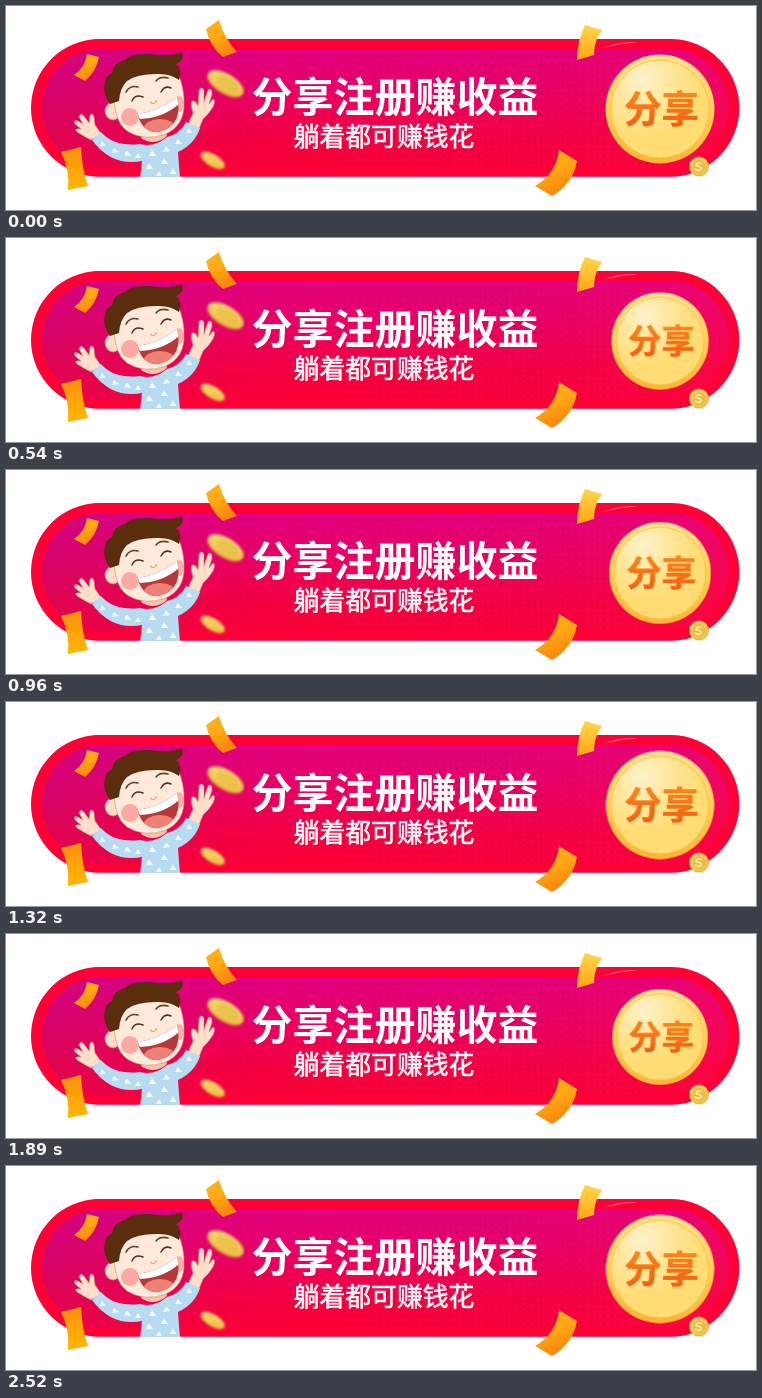
Animation of 750x204 px, one loop 2550 ms. Source, as an HTML page:

```html
<!DOCTYPE html>
<html lang="zh">
<head>
<meta charset="utf-8">
<style>
html, body { margin: 0; width: 100%; height: 100%; overflow: hidden; background: #fff; }
svg { display: block; width: 750px; height: 204px; }
text { font-family: "Noto Sans CJK SC", "Noto Sans CJK", sans-serif; text-anchor: middle; }
.share { transform-origin: 654px 103px; animation: pulse 2550ms linear infinite; }
@keyframes pulse {
  0%, 50.6%, 100% { transform: scale(1); }
  25.3%, 75.3% { transform: scale(.873); }
}
</style>
</head>
<body>
<svg viewBox="0 0 750 204">
  <defs>
    <linearGradient id="panel" x2="0" y2="1">
      <stop stop-color="#e20082"/>
      <stop offset=".4" stop-color="#ec0062"/>
      <stop offset=".75" stop-color="#f70040"/>
      <stop offset="1" stop-color="#fd0035"/>
    </linearGradient>
    <linearGradient id="side">
      <stop stop-color="#a01080" stop-opacity=".3"/>
      <stop offset=".4" stop-color="#d00070" stop-opacity="0"/>
      <stop offset="1" stop-color="#ff1050" stop-opacity=".3"/>
    </linearGradient>
    <linearGradient id="ribbon" x2=".4" y2="1">
      <stop stop-color="#ffb31c"/>
      <stop offset=".5" stop-color="#ffa914"/>
      <stop offset="1" stop-color="#fb860b"/>
    </linearGradient>
    <linearGradient id="pale" x2="0" y2="1">
      <stop stop-color="#ffd84a"/>
      <stop offset="1" stop-color="#ffa416"/>
    </linearGradient>
    <linearGradient id="amber" x2="0" y2="1">
      <stop stop-color="#fa900c"/>
      <stop offset="1" stop-color="#ffb705"/>
    </linearGradient>
    <linearGradient id="rim" x2="0" y2="1">
      <stop stop-color="#ffe28c"/>
      <stop offset=".5" stop-color="#ffcf55"/>
      <stop offset="1" stop-color="#fbb536"/>
    </linearGradient>
    <radialGradient id="disc" cx=".32" cy=".2" r=".6">
      <stop stop-color="#fff3cc"/>
      <stop offset=".5" stop-color="#ffe69a"/>
      <stop offset="1" stop-color="#ffdd74"/>
    </radialGradient>
    <linearGradient id="ink" x2="0" y2="1">
      <stop stop-color="#fb9420"/>
      <stop offset="1" stop-color="#f4560f"/>
    </linearGradient>
    <linearGradient id="gold" x2="1" y2="1">
      <stop stop-color="#f3d878"/>
      <stop offset="1" stop-color="#efbc3a"/>
    </linearGradient>
    <linearGradient id="fade">
      <stop stop-color="#fff" stop-opacity=".2"/>
      <stop offset=".75" stop-color="#fff"/>
      <stop offset="1" stop-color="#fff" stop-opacity=".4"/>
    </linearGradient>
    <mask id="spread"><path d="M210 47H650V160H210Z" fill="url(#fade)"/></mask>
    <pattern id="dots" width="7" height="7" patternUnits="userSpaceOnUse">
      <circle cx="3.5" cy="3.5" r="1.4" fill="#b80048" opacity=".4"/>
    </pattern>
    <filter id="soft"><feGaussianBlur stdDeviation=".8"/></filter>
    <clipPath id="pill"><path d="M0 0H750V171H0Z"/></clipPath>
    <clipPath id="mouth"><path d="M132 108Q154 105 171 91Q176 111 164 121Q149 131 138 121Q133 116 132 108Z"/></clipPath>
  </defs>

  <rect x="25" y="33" width="708.3" height="137.7" rx="68.8" fill="#ff0036"/>
  <g>
    <rect id="inner" x="36" y="43" width="687" height="118" rx="59" fill="url(#panel)"/>
    <rect x="36" y="43" width="687" height="118" rx="59" fill="url(#side)"/>
    <rect x="210" y="47" width="440" height="113" fill="url(#dots)" mask="url(#spread)"/>
  </g>

  <!-- boy -->
  <g clip-path="url(#pill)">
    <path d="M85 134Q77 130 71 126Q67 122 75 123L69 118Q67 113 72 115L77 118 73 111Q74 106 78 110L83 117 84 109Q87 106 88 111L89 119Q93 124 95 128Z" fill="#ffdfca" stroke="#c98a72" stroke-width=".6"/>
    <path d="M182 118L187 107Q184 98 186 95Q190 94 192 100L193 84Q195 80 198 84L198 96 202 84Q206 81 206 88L203 98 207 93Q210 94 207 101Q202 109 197 113L193 123Z" fill="#ffdfca" stroke="#c98a72" stroke-width=".6"/>
    <path d="M86 134L95 126Q108 141 134 138Q148 142 161 131Q174 128 180 116L194 122Q189 138 172 146L174 172H134L136 155Q106 161 86 134Z" fill="#b9dbf2"/>
    <path d="M96 135l4 5h-6zm12 7l5 4-7 1zm13 2l4 6-7-1zm11 3l3 5-6 0zm14-3l4 6-7 0zm14-4l4 5-7 1zm12-7l4 5-7 0zm11-11l3 5-6 0zM143 157l4 6-7 0zm15-5l4 6-7 0zm9 10l3 6-6 0zm-14 3l3 5-6 0z" fill="#f4faff"/>
    <path d="M135 132Q148 141 161 130L160 126 138 128Z" fill="#f3c3a8"/>
    <ellipse cx="107" cy="105" rx="8" ry="9" fill="#ffdcc5" stroke="#c98a72" stroke-width=".7"/>
    <path d="M107 82Q107 62 130 57Q157 48 171 66Q179 81 178 101Q177 120 160 128Q139 136 121 125Q107 115 107 82Z" fill="#fee9db" stroke="#c98a72" stroke-width=".6"/>
    <path d="M104 98Q96 88 99 76Q100 70 106 67Q107 57 119 54Q123 47 143 48Q165 51 176 46Q179 54 170 58Q177 63 173 74Q164 67 150 68Q131 68 121 75Q114 82 113 95Z" fill="#5a2d0c"/>
    <path d="M120 86Q124 79 132 81M150 75Q154 70 162 72" fill="none" stroke="#6d3d1c" stroke-width="1.6" stroke-linecap="round"/>
    <path d="M126 95Q129 88 137 91M155 86Q159 79 165 82" fill="none" stroke="#55301b" stroke-width="1.5" stroke-linecap="round"/>
    <circle cx="124" cy="111" r="9" fill="#f9918c" opacity=".75"/>
    <ellipse cx="173" cy="98" rx="5" ry="8" fill="#f9918c" opacity=".65"/>
    <path d="M144 96Q148 100 151 94" fill="none" stroke="#e8a888" stroke-width="1.3"/>
    <g clip-path="url(#mouth)">
      <path d="M125 85H180V135H125Z" fill="#b8393b"/>
      <ellipse cx="154" cy="122" rx="16" ry="9" fill="#ee8078"/>
      <path d="M130 106Q154 105 173 89L173 98Q157 112 134 113Z" fill="#fff"/>
    </g>
  </g>

  <!-- coins -->
  <g transform="translate(220 77) rotate(31)" filter="url(#soft)">
    <ellipse cy="1.5" rx="20" ry="9.5" fill="#dba23c"/>
    <ellipse rx="20" ry="9" fill="url(#gold)"/>
    <ellipse cx="2" rx="12" ry="6" fill="#eac24e"/>
  </g>
  <g transform="translate(207 154) rotate(31)" filter="url(#soft)">
    <ellipse cy=".8" rx="13.5" ry="6" fill="#dba23c"/>
    <ellipse rx="13" ry="5.5" fill="url(#gold)"/>
  </g>
  <g transform="translate(693 160.5)">
    <circle r="10" fill="#e9b53c"/>
    <circle r="9" fill="url(#gold)"/>
    <circle r="6.5" fill="#e9bd48"/>
    <path d="M3 -3Q-2 -5 -3 -1Q3 0 2 3Q-1 5 -4 2" fill="none" stroke="#fff2b0" stroke-width="1.3"/>
  </g>

  <!-- confetti -->
  <path d="M596 42Q612 35 632 36Q614 38 596 42Z" fill="#fff" opacity=".35"/>
  <g fill="url(#ribbon)">
    <path d="M200 23L213 14Q218 32 231 46L217 51Q204 41 200 23Z"/>
    <path d="M81 48L93 51Q90 66 79 75L68 69Q79 62 81 48Z"/>
    <path d="M553 144L571 155Q567 178 546 190L529 180Q550 168 553 144Z"/>
  </g>
  <path d="M579 19L596 24Q588 35 588 49L571 54Q571 35 579 19Z" fill="url(#pale)"/>
  <path d="M55 146L75 141Q76 163 82 180L62 184Q64 164 55 146Z" fill="url(#amber)"/>

  <text x="389" y="105.5" font-size="41" font-weight="700" fill="#fff">分享注册赚收益</text>
  <text x="378" y="140" font-size="25.8" font-weight="500" fill="#fff" stroke="#fff" stroke-width=".6">躺着都可赚钱花</text>

  <g class="share">
    <circle cx="654" cy="103" r="54.5" fill="url(#rim)"/>
    <circle cx="654" cy="103" r="49" fill="url(#disc)" stroke="#fcc24c" stroke-width="1"/>
    <text x="655.5" y="117" font-size="37.5" font-weight="700" fill="url(#ink)" stroke="url(#ink)" stroke-width=".5">分享</text>
  </g>
</svg>
</body>
</html>
```
